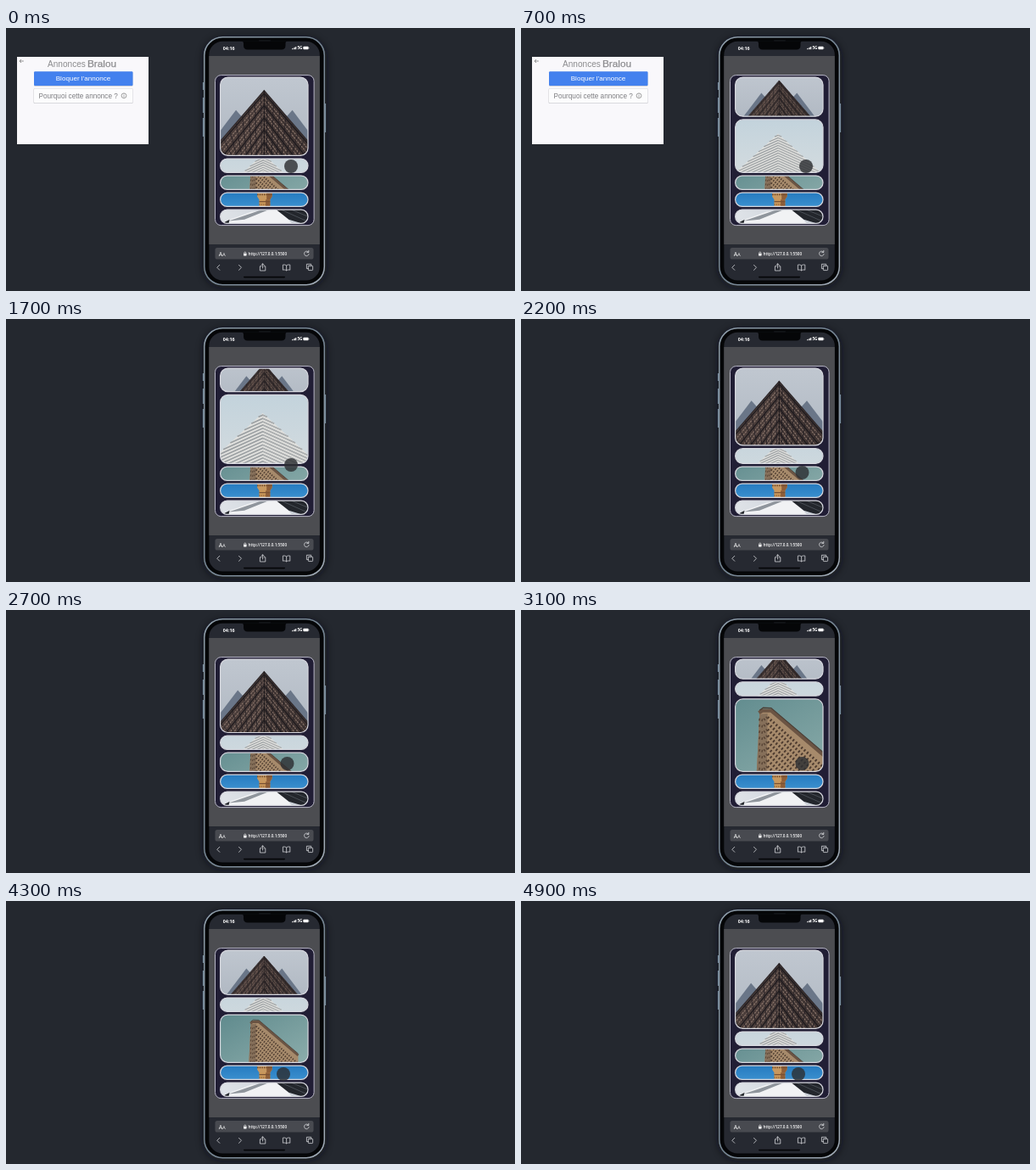
Write an HTML page that moves like this. It is 600x310 px and loops after 5 s.

```html
<!DOCTYPE html>
<html lang="fr">
<head>
<meta charset="utf-8">
<title>Accordion gallery on a phone</title>
<style>
  html, body { margin: 0; width: 100%; height: 100%; overflow: hidden; background: #24282f; }
  svg { display: block; width: 100vw; height: 100vh; }
  .ad text { font-family: "Liberation Sans", Arial, sans-serif; }
  .phone text { font-family: "Open Sans", "Noto Sans", sans-serif; fill: #fff; }
  .icon { fill: none; stroke: #dfe1e5; stroke-width: .75; stroke-linecap: round; stroke-linejoin: round; }
</style>
</head>
<body>
<svg id="stage" viewBox="0 0 600 310">
  <defs>
    <filter id="soft" x="-20%" y="-10%" width="140%" height="120%"><feGaussianBlur stdDeviation="4"/></filter>
    <linearGradient id="rim" x2="1" y2="1">
      <stop offset="0" stop-color="#8f9eaa"/><stop offset=".5" stop-color="#748492"/><stop offset="1" stop-color="#a3adb8"/>
    </linearGradient>
    <linearGradient id="sky0" x2="0" y2="1"><stop offset="0" stop-color="#c0c7d0"/><stop offset="1" stop-color="#b0b8c2"/></linearGradient>
    <linearGradient id="sky1" x2="0" y2="1"><stop offset="0" stop-color="#c3d3dc"/><stop offset="1" stop-color="#d3dbdf"/></linearGradient>
    <linearGradient id="sky2" x2="1" y2="1"><stop offset="0" stop-color="#5f8a8d"/><stop offset="1" stop-color="#8cadab"/></linearGradient>
    <linearGradient id="sky3" x2="0" y2="1"><stop offset=".2" stop-color="#1b70b8"/><stop offset=".8" stop-color="#459ad6"/></linearGradient>
    <linearGradient id="sky4" x2="1" y2="0"><stop offset="0" stop-color="#dfe3e8"/><stop offset="1" stop-color="#c6ccd4"/></linearGradient>
  </defs>

  <rect width="600" height="310" fill="#24282f"/>

  <g class="ad" id="ad">
    <rect x="13" y="34" width="155" height="103" fill="#f9f8fb"/>
    <path d="M20.8 39H16M18 37l-2 2 2 2" fill="none" stroke="#777" stroke-width=".8"/>
    <text x="49" y="46" font-size="10.1" fill="#8b8b8e">Annonces</text>
    <text x="96" y="46" font-size="11.8" fill="#8b8b8e" stroke="#8b8b8e" stroke-width=".25">Bralou</text>
    <rect x="33" y="51.8" width="116.5" height="17" rx="1.2" fill="#c9cbd3"/>
    <rect x="33" y="51.2" width="116.5" height="16.8" rx="1.2" fill="#4381ee"/>
    <text x="91" y="62.4" font-size="8.1" fill="#fff" text-anchor="middle">Bloquer l'annonce</text>
    <rect x="32.5" y="71.3" width="117.2" height="17.8" rx="1.4" fill="#cdcdd2"/>
    <rect x="33" y="71.4" width="116.3" height="16.8" rx="1.2" fill="#fcfcfd"/>
    <text x="38.5" y="82.8" font-size="8.2" fill="#7d7d80">Pourquoi cette annonce ?</text>
    <circle cx="139" cy="79.8" r="2.9" fill="none" stroke="#777" stroke-width=".7"/>
    <path d="M139 79.3v2M139 77.7v.7" stroke="#777" stroke-width=".8"/>
  </g>

  <g class="phone">
    <rect x="232" y="11" width="146" height="295" rx="24" fill="#0c0e12" opacity=".6" filter="url(#soft)"/>
    <path d="M232.6 64v9M232.6 82v18M232.6 106v22M376.4 89v34" stroke="#73889a" stroke-width="1.4"/>
    <rect x="233.8" y="10.8" width="141.5" height="291.9" rx="21.5" fill="#050608" stroke="url(#rim)" stroke-width="1.5"/>
    <clipPath id="glass"><rect x="239.3" y="15.8" width="130.5" height="281.7" rx="16"/></clipPath>
    <g clip-path="url(#glass)">
      <rect x="239" y="15" width="132" height="284" fill="#262931"/>
      <rect x="239" y="33" width="132" height="222" fill="#4c4d51"/>
    </g>
    <path d="M277 15.4h55q-2.5 0-2.5 2.5v2.6q0 5-5 5h-39.5q-5 0-5-5v-2.6q0-2.5-3-2.5z" fill="#050608"/>
    <rect x="298" y="14.2" width="14" height="1.3" rx=".65" fill="#16181c"/>

    <text x="255.8" y="25.8" font-size="5.4" font-weight="700">04:16</text>
    <path d="M337.6 25.2v-1M339 25.2v-1.7M340.4 25.2v-2.5M341.8 25.2v-3.2" stroke="#fff" stroke-width="1"/>
    <text x="343.4" y="25.3" font-size="4.6" font-weight="700">5G</text>
    <rect x="350.3" y="21.8" width="6.3" height="3.5" rx="1" fill="#fff"/>
    <path d="M357.2 23v1.2" stroke="#bbb" stroke-width=".6"/>

    <rect x="246.5" y="259" width="116" height="13.6" rx="2.6" fill="#484a50"/>
    <text x="250.8" y="268.6" font-size="7">A<tspan font-size="5.4">A</tspan></text>
    <path d="M280.7 266v-.9a1.1 1.1 0 0 1 2.2 0v.9" fill="none" stroke="#fff" stroke-width=".6"/>
    <rect x="280.1" y="265.8" width="3.4" height="2.7" rx=".5" fill="#fff"/>
    <text x="285.5" y="268.3" font-size="4.6" font-weight="600">http://127.0.0.1:5500</text>
    <g class="icon">
      <path d="M356.6 264.2a2.8 2.8 0 1 0 .5 2.3M356.8 262.3v2.1h-2.1"/>
      <path d="M251.8 279.3l-3 3 3 3M274.5 279.3l3 3-3 3"/>
      <path d="M301 280.8h-1.6v5.2h6.4v-5.2h-1.6M302.6 283v-5M300.9 279.5l1.7-1.7 1.7 1.7"/>
      <path d="M330.6 280c-1-1-3-1.2-4.2-.8v6c1.4-.4 3.2-.2 4.2.6c1-.8 2.8-1 4.2-.6v-6c-1.2-.4-3.2-.2-4.2.8v5.8"/>
      <rect x="356.3" y="280.3" width="5.3" height="5.3" rx=".8"/>
      <path d="M356.3 283.6h-1.9v-5.3h5.3v2"/>
    </g>
    <rect x="280" y="292.8" width="49" height="1.6" rx=".8" fill="#050608"/>

    <rect x="246.5" y="55.6" width="116.6" height="177" rx="7" fill="#211e35" stroke="#b9b8c8" stroke-width="1"/>
    <g id="cards"></g>
    <circle id="touch" r="8" fill="#2d2f33" fill-opacity=".82"/>
  </g>
</svg>

<script>
const LOOP = 5000, STEP = 100;
const LEFT = 252.6, WIDTH = 103.4, TOP = 58.1, GAP = 3.7;
const SMALL = 16.3, GROW = 76, RATIO = 16 / 9;
const SLIDE = 725;
const MIDDLE = LEFT + WIDTH / 2;
const $ = id => document.getElementById(id);

// Scenes use the picture height as unit, with the origin in the middle.
const poly = (points, fill) => `<polygon points="${points}" fill="${fill}"/>`;
const line = (points, color, width, dash = '') =>
  `<polyline points="${points}" fill="none" stroke="${color}" stroke-width="${width}" stroke-dasharray="${dash}"/>`;
const range = (n, make) => Array.from({ length: n }, (_, i) => make(i)).join('');

function darkTower() {
  const slope = 1.15, top = -.33, foot = .72;
  const side = s => poly(`${s * .2},.1 ${s * .36},-.08 ${s * .8},.5 ${s * .2},.5`, '#6a7688');
  const rows = s => range(17, k => {
    const y = top + .035 + k * .052;
    return line(`0,${y} ${s * .8},${y + .8 * slope + k * .02}`, k % 3 ? '#8a756b' : '#1c191d', .013, k % 3 ? '.025 .012' : '');
  });
  const ribs = s => range(8, k => {
    const x = .04 + k * .08;
    return line(`${s * x},${top + x * slope} ${s * x * .8},.5`, '#262125', .01);
  });
  return side(-1) + side(1) +
    poly(`0,${top} ${foot},.5 ${-foot},.5`, '#4a3d3a') +
    poly(`0,${top} ${foot},.5 0,.5`, '#3f3432') +
    rows(-1) + rows(1) + ribs(-1) + ribs(1) +
    line(`${-foot},.5 0,${top} ${foot},.5`, '#312b2d', .014) + line(`0,${top} 0,.5`, '#221d20', .014);
}

function whiteTower() {
  const top = -.235, slope = .92, tilt = .45;
  const bands = range(15, k => {
    const y = top + .03 + k * .048, w = (y - top) / (slope - tilt);
    const edge = y + tilt * w;
    return line(`${-w},${edge} 0,${y} ${w},${edge}`, '#9a9fa2', .02) +
      line(`0,${y} ${w},${edge}`, '#b9bbbb', .009);
  });
  const foot = (.5 - top) / slope;
  return `<g transform="translate(-.02 0)">${poly(`0,${top} ${foot},.5 ${-foot},.5`, '#e0e0dd')}${bands}</g>`;
}

function cornerBlock() {
  const rows = range(11, k => {
    const y = -.25 + k * .085;
    return line(`-.16,${y} .69,${y + .76}`, '#4c3a2e', .036, '.022 .03') +
      line(`-.28,${y + .03} -.22,${y + .045} -.16,${y}`, '#5a4637', .034, '.018 .02');
  });
  return poly('-.31,.5 -.27,-.29 -.23,-.36 -.1,-.36 .69,.32 .69,.5', '#a68a6b') +
    poly('-.31,.5 -.27,-.29 -.16,-.3 -.17,.5', '#86705a') + rows +
    line('-.28,-.31 -.23,-.34 -.11,-.34 .69,.34', '#6b5443', .05) +
    line('-.27,-.345 -.22,-.38 -.11,-.375 .69,.305', '#4a3d34', .014);
}

function goldTower() {
  return poly('-.1,.5 -.1,-.06 .12,-.06 .12,.5', '#c9975a') +
    poly('.03,.5 .03,-.06 .12,-.06 .12,.5', '#8f5f3a') +
    poly('-.14,-.2 .16,-.2 .16,-.06 .12,0 -.1,0 -.14,-.06', '#c79860') +
    poly('.05,-.2 .16,-.2 .16,-.06 .12,0 .05,0', '#8f5f3a') +
    line('-.14,-.1 .16,-.1', '#6e4a30', .03, '.025 .02') +
    line('-.1,.04 .12,.04', '#7a5234', .02) + line('-.1,.1 .12,.1', '#84552d', .02, '.02 .02');
}

function whiteRoofs() {
  return poly('-.889,.13 -.25,-.1 .3,-.15 .889,.5 -.889,.5', '#f1f2f4') +
    poly('-.889,.16 -.7,.06 -.72,.14 -.889,.22', '#23262b') +
    poly('-.72,.09 -.1,-.12 .1,-.14 -.4,.06', '#8f959c') +
    poly('.22,-.16 .889,-.16 .889,.18 .8,.15 .5,.06', '#23262c') +
    line('.34,-.14 .86,.09', '#4b5058', .016) + line('.55,-.14 .889,0', '#4b5058', .016);
}

const scenes = [darkTower, whiteTower, cornerBlock, goldTower, whiteRoofs];
$('cards').innerHTML = scenes.map((scene, i) => `
  <clipPath id="clip${i}"><rect class="box${i}" x="${LEFT}" width="${WIDTH}"/></clipPath>
  <g clip-path="url(#clip${i})"><g id="scene${i}">
    <rect x="${-RATIO / 2}" y="-.5" width="${RATIO}" height="1" fill="url(#sky${i})"/>${scene()}
  </g></g>
  <rect class="box${i}" x="${LEFT}" width="${WIDTH}" fill="none" stroke="#d5d6dd" stroke-width="1.2"/>`).join('');
const boxes = scenes.map((_, i) => document.querySelectorAll('.box' + i));

const clamp = v => Math.min(1, Math.max(0, v));
const mix = (a, b, p) => a + (b - a) * p;
const phase = (t, start, length) => clamp((t - start) / length);
const smooth = p => p * p * (3 - 2 * p);

// cubic-bezier(.25, .1, .25, 1)
function ease(x) {
  const curve = (a, b, s) => 3 * a * s * (1 - s) ** 2 + 3 * b * s * s * (1 - s) + s ** 3;
  let low = 0, high = 1;
  for (let i = 0; i < 20; i++) {
    const s = (low + high) / 2;
    if (curve(.25, .25, s) < x) low = s; else high = s;
  }
  return curve(.1, 1, high);
}

const opened = (t, from, to) => ease(phase(t, from, SLIDE)) - ease(phase(t, to, SLIDE));

function placeCards(t) {
  const second = opened(t, 445, 1605), third = opened(t, 2636, 4097);
  const shares = [1 - second - third, second, third, 0, 0];
  let y = TOP;
  shares.forEach((share, i) => {
    const h = SMALL + GROW * share;
    for (const box of boxes[i]) {
      box.setAttribute('y', y);
      box.setAttribute('height', h);
      box.setAttribute('rx', Math.min(9, h / 2));
    }
    const size = Math.max(h, WIDTH / RATIO);
    $('scene' + i).setAttribute('transform', `translate(${MIDDLE} ${y + h / 2}) scale(${size})`);
    y += h + GAP;
  });
}

function placeTouch(t) {
  const first = smooth(phase(t, 1350, 700)), next = smooth(phase(t, 3850, 430));
  const x = 336 - 4.5 * smooth(phase(t, 1700, 450)) - 4.5 * next;
  const y = mix(mix(163, 181, first), 204, next);
  $('touch').setAttribute('cx', x);
  $('touch').setAttribute('cy', y);
}

function draw(t) {
  $('ad').style.display = t < 1500 ? '' : 'none';
  placeCards(t);
  placeTouch(t);
}

const begin = performance.now();
function tick() {
  const t = (performance.now() - begin + 8) % LOOP;
  draw(Math.floor(t / STEP) * STEP);
  requestAnimationFrame(tick);
}
tick();
</script>
</body>
</html>
```
